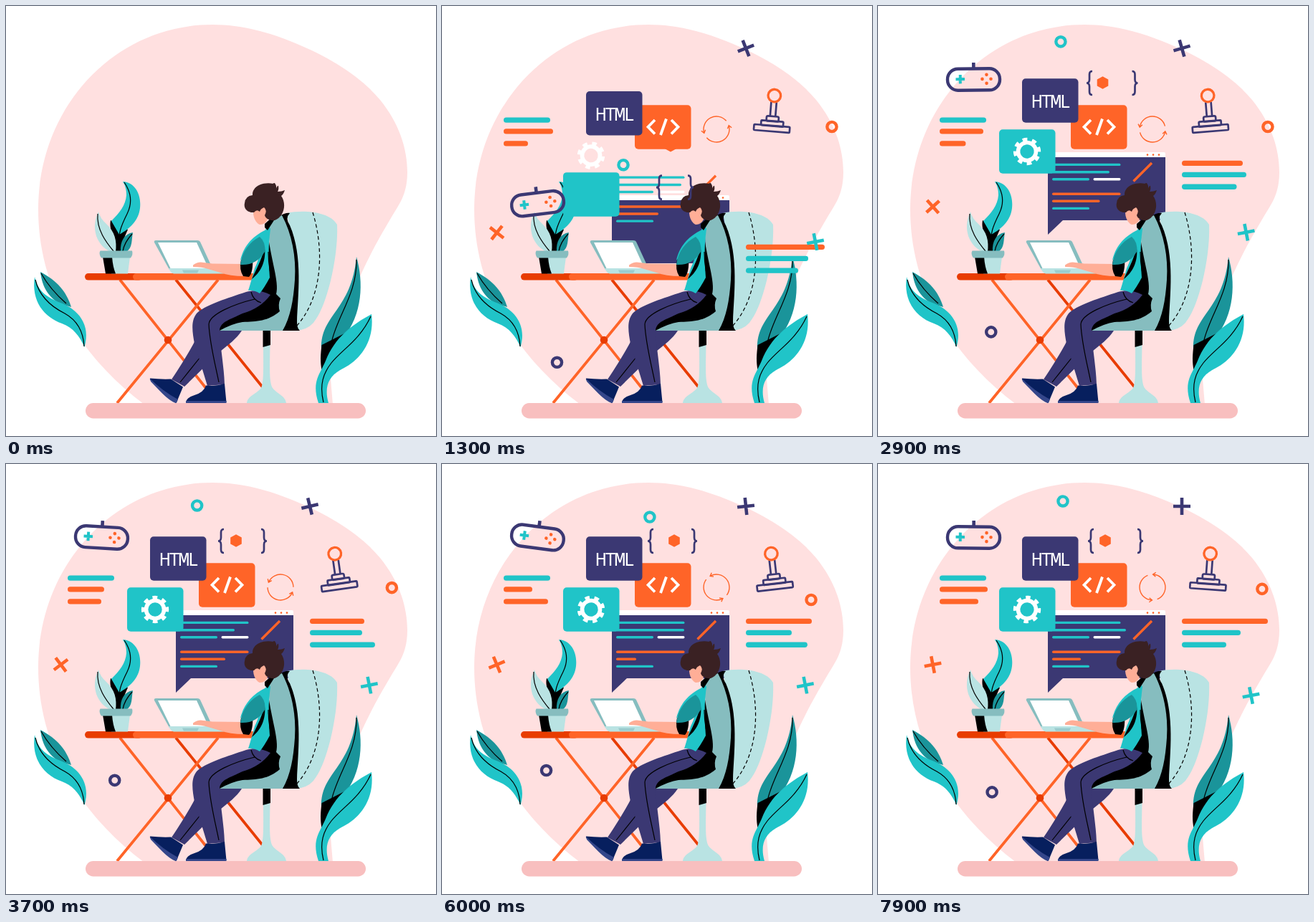
Write an HTML page without scripts that moves like this. It is 600 px wide and 600 px high and loops after 8000 ms.

```html
<!DOCTYPE html>
<html lang="en">
<head>
<meta charset="utf-8">
<title>Developer at a desk</title>
<style>
@property --t { syntax: "<number>"; inherits: true; initial-value: 0; }
html, body { margin: 0; width: 100%; height: 100%; overflow: hidden; background: #fff; }
svg { display: block; width: 100vw; height: 100vh; animation: clock 8s linear infinite; }
/* --t is the time in ms; all motion is worked out from it */
@keyframes clock { from { --t: 0; } to { --t: 8000; } }

.in {
  translate: 0 calc(118px * (1 + cos(clamp(0, (var(--t) - var(--at)) / 1255, 1) * 180deg)));
  opacity: clamp(0, (var(--t) - var(--at) - 35) / 365, 1);
}
.drift {
  --p: calc((1 - cos(max(0, var(--t) - var(--s)) / var(--per, 6200) * 360deg)) / 2);
  translate: calc(var(--x) * var(--p)) calc(var(--y) * var(--p));
}
.rock { rotate: calc(var(--amp) * sin((var(--t) - var(--zero)) / var(--half) * 180deg)); }
.spin { rotate: calc(var(--r) + var(--t) * var(--w)); }
.len { animation: len 8s linear infinite; }
.slide { animation: slide 8s linear infinite; }
@keyframes len {
  0%, 10% { width: var(--a); }
  16.25% { width: var(--b); }
  26.25% { width: var(--c); }
  46.25% { width: var(--d); }
  75% { width: var(--e); }
  98.75%, 100% { width: var(--f); }
}
@keyframes slide {
  0%, 10% { translate: var(--a); }
  16.25% { translate: var(--b); }
  26.25% { translate: var(--c); }
  46.25% { translate: var(--d); }
  75% { translate: var(--e); }
  98.75%, 100% { translate: var(--f); }
}

.teal { fill: #20c4c8; }
.deep { fill: #1a949a; }
.pale { fill: #b9e3e3; }
.grey { fill: #86bdbf; }
.orange { fill: #ff6428; }
.red { fill: #e83c00; }
.navy { fill: #3b3873; }
.skin { fill: #ffae97; }
.hair { fill: #3a2123; }
.shoe { fill: #071f5e; }
.sole { fill: #34468a; }
.white { fill: #fff; }
.line { fill: none; stroke: #000; stroke-width: 1.2; }
.s-teal, .s-orange, .s-red, .s-navy, .s-white { fill: none; }
.s-teal { stroke: #20c4c8; }
.s-orange { stroke: #ff6428; }
.s-red { stroke: #e83c00; }
.s-navy { stroke: #3b3873; }
.s-white { stroke: #fff; }
.html { font: 26px "Noto Sans Mono", "DejaVu Sans Mono", monospace; letter-spacing: -2.3px; }
</style>
</head>
<body>
<svg viewBox="0 0 600 600">
  <defs>
    <path id="plus" d="M-12 0H12M0-12V12" stroke-width="4.6"/>
    <circle id="ring" r="6.6" stroke-width="4.4"/>
    <path id="brace" d="M4-16.5Q0-16.5 0-12V-5Q0 0-4 0Q0 0 0 5V12Q0 16.5 4 16.5" stroke-width="2.7"/>
    <path id="arrow" d="M18 0A18 18 0 0 1-16.3 7.6M15 3.5 18-.5 21 3.5" stroke-width="1.4"/>
  </defs>

  <!-- backdrop -->
  <path fill="#ffe0e0" d="M288 26C330 26 368 37 404 52C450 71 494 97 522 131C548 163 560 198 560 232C560 262 549 276 540 291C524 318 509 344 496 373C475 420 451 470 453 520L456 556H193C150 524 112 483 86 437C58 388 45 336 45 284C45 140 152 26 288 26Z"/>

  <!-- code window -->
  <g class="in" style="--at:468">
    <path class="white" d="M237 212V206Q237 204 239 204H399Q401 204 401 206V212Z"/>
    <path class="navy" d="M237 211H401V297Q401 299 399 299H258L237 319Z"/>
    <g class="orange"><circle cx="376" cy="207.6" r="1.3"/><circle cx="384" cy="207.6" r="1.3"/><circle cx="392" cy="207.6" r="1.3"/></g>
  </g>
  <g class="in" style="--at:268">
    <g class="teal">
      <rect x="243" y="219.7" width="95.5" height="3.4" rx="1.7"/>
      <rect class="len" x="243" y="230" height="3.4" rx="1.7" style="--a:93px;--b:91px;--c:84px;--d:76px;--e:95px;--f:103px"/>
      <rect x="243" y="240" width="52" height="3.4" rx="1.7"/>
      <rect x="243" y="280.7" width="52" height="3.4" rx="1.7"/>
    </g>
    <rect class="white" x="300.5" y="240" width="38" height="3.4" rx="1.7"/>
    <g class="orange">
      <rect x="243" y="260.5" width="95.5" height="3.4" rx="1.7"/>
      <rect class="len" x="243" y="270.5" height="3.4" rx="1.7" style="--a:52px;--b:59px;--c:70px;--d:63px;--e:28px;--f:40px"/>
    </g>
    <path class="s-orange" d="M356.5 244.500 382 219" stroke-width="3.3"/>
  </g>

  <!-- upper cards -->
  <g class="in" style="--at:570">
    <path class="orange slide" d="M0 98.200 7.800 102.600V111.400L0 115.800-7.800 111.400V102.600Z" style="--a:326px;--b:319px;--c:306px;--d:321px;--e:324px;--f:317px"/>
  </g>
  <g class="in" style="--at:-30">
    <rect class="orange" x="269" y="138.300" width="78.500" height="61.500" rx="5"/>
    <path class="s-white" d="M297 159 287.500 168.800 297 178.500M320 159 329.500 168.800 320 178.500M313 157.500 305 180" stroke-width="3.800"/>
  </g>
  <g class="in" style="--at:268">
    <rect class="navy" x="201" y="101.200" width="78.500" height="61.500" rx="5"/>
    <text class="white html" x="213.900" y="142">HTML</text>
  </g>

  <!-- table -->
  <g stroke-width="3.800">
    <path class="s-red" d="M237 382 359 533"/>
    <path class="s-orange" d="M159 382 282 537M296 382 155 554"/>
  </g>
  <circle class="red" cx="226" cy="466" r="5.300"/>
  <rect class="red" x="110" y="373" width="80" height="9.600" rx="4.800"/>
  <rect class="orange" x="177" y="373" width="172" height="9.600" rx="4.800"/>

  <!-- laptop -->
  <path class="grey" d="M209 327H267Q270 327 271 329L289 368H228L207 330Q206 327 209 327Z"/>
  <path class="white" d="M212 330H266L283 367H230Z"/>
  <path class="pale" d="M227 366H296L304 373.500H234Q230 373 227 366Z"/>
  <path class="grey" d="M246 368.500H269L267 372.500H248Z" opacity=".6"/>

  <!-- potted plant -->
  <path d="M146 299C143 312 153 326 153 343H160C162 330 165 323 170 312Z"/>
  <path class="teal" d="M163 245C180 246 189 263 187 282C185 300 172 311 158 319L147 300C158 289 167 278 168 264Q168 252 163 245Z"/>
  <path class="line" d="M165 246C176 262 176 276 169 290C162 304 155 318 157 342"/>
  <path class="pale" d="M129 287Q131 296 140 304C152 315 155 328 153 343H146C128 335 117 312 129 287Z"/>
  <path class="line" d="M128 290C126 312 140 330 150 342" stroke-width=".8"/>
  <path class="deep" d="M177 316C165 318 159 328 160 343H168C177 337 175 326 177 316Z"/>
  <path class="line" d="M176 318Q165 330 163 342" stroke-width=".8"/>
  <path class="pale" d="M147 350H173L170 373.500H147Z"/>
  <path d="M135 350H148Q149 364 153 373.500H139Z"/>
  <path class="grey" d="M131.500 341.500H176Q177.500 347 174 351.500H133Q129 346 131.500 341.500Z"/>

  <!-- left leaves -->
  <path class="deep" d="M48 371C72 384 84 398 91 420L74 415C54 402 50 386 48 371Z"/>
  <path class="line" d="M49 373Q62 396 84 415"/>
  <path class="teal" d="M40 378C44 398 58 407 76 414C100 423 119 444 109.500 476C103 461 94 449 78 443C53 434 35 412 40 378Z"/>
  <path class="line" d="M41 382C47 408 66 421 82 429C100 439 108 455 109 475"/>

  <!-- right leaves -->
  <path class="deep" d="M489 350C499 385 498 430 470 464L440 478C439 430 482 425 489 350Z"/>
  <path d="M440.500 473 476 455C472 470 452 488 441 510C438 497 439 486 440.500 473Z"/>
  <path class="line" d="M489 354C490 400 464 430 455 466"/>
  <path class="teal" d="M510 430C515 472 490 497 468 507C449 517 444 533 450 554H436C426 524 438 514 446 495C459 462 484 444 510 430Z"/>
  <path class="line" d="M509 433C494 466 468 480 454 498C443 512 437 528 443 553"/>

  <!-- chair -->
  <path class="pale" d="M359 473H368.500C368 505 367 525 372 533C378 541 390 544 391 554H336C337 544 350 541 356 533C360 524 359 500 359 473Z"/>
  <path d="M358.500 452H369V473L358.500 476Z"/>
  <path class="pale" d="M392 289C412 284 452 286 462 305C464 350 448 420 429 442Q419 453 403 453L404 360Z"/>
  <path class="line" d="M428 288C444 340 442 405 406 446" stroke-dasharray="5 3.500" stroke-width="1.500"/>
  <path d="M380 294Q390 288 396 289Q389 296 396 306C415 350 407 405 406 440Q406 450 410 453H382Z"/>
  <path class="grey" d="M366 308Q376 294 385 292C399 318 405 350 403 382C401 411 397 434 386 453H297L302 438 372 400Z"/>
  <path d="M365 312C368 350 382 385 377 402L383 408Q379 417 382 426C366 440 350 440 330 441Q316 443 298 453L298 430 360 390Z"/>

  <!-- legs -->
  <path class="navy" d="M297 453H329C322 464 310 473 300 481L249 531 231 521Q252 490 266 463Z"/>
  <path class="line" d="M271 490 243 525"/>
  <path class="shoe" d="M201 519.500Q215 521 230 520.500L247 531.500 238 553Q220 540 204 525Q200 521 201 519.500Z"/>
  <path class="sole" d="M201 520Q218 537 240 549L237.500 554.500C225 550 212 534 202 524Z"/>
  <path class="navy" d="M369 403C358 397 346 396 335 399C308 408 282 416 268 427C257 437 260 455 263 471L281 530 305 528C304 500 298 470 298 452C300 440 312 438 330 429Q355 422 369 403Z"/>
  <path class="line" d="M342 399Q345 411 356 414M347 409C318 416 284 430 283 444C284 470 292 500 297 525" stroke-width="1.500"/>
  <path class="shoe" d="M279 529.500Q293 531 305 527L307.500 553H251Q252 546 263 543Q276 539 279 529.500Z"/>
  <path class="sole" d="M251 551H307.500V554H251Z"/>

  <!-- body -->
  <path class="skin" d="M261 361.500Q268 356 276 358L288 359.500 329 360 333 377Q312 377 299 372L282 367Q274 364 261 364Z"/>
  <path class="teal" d="M363 310Q368 307 369 311C365 340 367 360 368 379Q360 394 354 401Q345 396 338 397C342 385 344 376 347 366C357 346 355 332 363 310Z"/>
  <path d="M361 338C363 357 355 372 343 381C349 368 356 355 361 338Z"/>
  <path d="M328 354 344 352C345 364 343 374 339 378L331 377Q325 368 328 354Z"/>
  <path class="teal" d="M327 355C331 337 342 322 363 312L364 333Q350 326 327 355Z"/>
  <path class="deep" d="M327 361C329 343 340 329 354 322Q363 330 361 343C353 356 342 362 327 361Z"/>
  <path class="line" d="M366 343Q366 370 375 394" stroke="#333"/>
  <path d="M361 304 371 295 374 299 365 313 361 309Z"/>
  <path class="skin" d="M346 284C343 291 348 303 354 305C361 305 365 300 366 294L366 278 350 278Z"/>
  <path class="hair" d="M346 288C338 289 331 283 333 275Q334 265 344 264C343 252 358 245 373 248Q371 247 375 247Q378 251 377 255Q379 250 380 251Q381 256 379 259Q385 259 389 257Q387 263 384 265C392 276 388 294 375 299C367 300 362 296 361 292Q365 285 360 281Q355 283 354 287Q350 283 346 288Z"/>
  <rect x="111" y="554" width="391" height="21.500" rx="10.700" fill="#f8bfbf"/>

  <!-- gear card -->
  <g class="in" style="--at:468"><rect class="teal" x="169" y="172.200" width="78.500" height="61.500" rx="5"/></g>
  <g class="in" style="--at:169" transform="translate(208 203)">
    <g class="spin s-white" style="--r:0deg;--w:.012deg">
      <circle r="12.500" stroke-width="5.600"/>
      <circle r="16.700" stroke-width="5" pathLength="16" stroke-dasharray="1" stroke-dashoffset=".5"/>
    </g>
  </g>

  <!-- text lines -->
  <g class="in" style="--at:-30">
    <rect class="teal" x="86" y="155.500" width="65" height="7.300" rx="3.600"/>
    <rect class="orange len" x="86" y="171.300" height="7.300" rx="3.600" style="--a:56px;--b:69px;--c:71px;--d:51px;--e:40px;--f:67px"/>
    <rect class="orange len" x="86" y="188.300" height="7.300" rx="3.600" style="--a:39px;--b:34px;--c:26px;--d:47px;--e:62px;--f:54px"/>
  </g>
  <g class="in" style="--at:670">
    <rect class="orange len" x="424" y="215.800" height="7.300" rx="3.600" style="--a:117px;--b:110px;--c:94px;--d:76px;--e:92px;--f:120px"/>
    <rect class="teal len" x="424" y="231.800" height="7.300" rx="3.600" style="--a:72px;--b:87px;--c:107px;--d:73px;--e:64px;--f:82px"/>
    <rect class="teal len" x="424" y="248.600" height="7.300" rx="3.600" style="--a:78px;--b:73px;--c:62px;--d:91px;--e:86px;--f:62px"/>
  </g>

  <!-- braces -->
  <g class="in s-navy" style="--at:768" transform="translate(0 107.500)">
    <g class="slide" style="--a:303px;--b:303px;--c:290px;--d:300px;--e:291px;--f:297px"><use href="#brace"/></g>
    <g class="slide" style="--a:347px;--b:347px;--c:357px;--d:360px;--e:352px;--f:366px"><use href="#brace" transform="scale(-1 1)"/></g>
  </g>

  <!-- turning arrows -->
  <g class="in" style="--at:-30" transform="translate(383 172)">
    <g class="spin s-orange" style="--r:-37deg;--w:.0165deg">
      <use href="#arrow"/><use href="#arrow" transform="rotate(180)"/>
    </g>
  </g>

  <!-- joystick -->
  <g class="in" style="--at:-30" transform="translate(462 148)">
    <g class="rock s-navy" stroke-width="2.700" style="--amp:-9.700deg;--zero:2100;--half:5100">
      <path d="M-3.700-14V6M3.700-14V6"/>
      <rect x="-8.500" y="6" width="17" height="7" rx="2"/>
      <rect x="-15.500" y="12.500" width="31" height="7" rx="1"/>
      <rect x="-25" y="19" width="50" height="8" rx="1"/>
      <circle class="s-orange" cy="-23" r="8.800" stroke-width="3.300"/>
    </g>
  </g>

  <!-- gamepad -->
  <g class="in" style="--at:868" transform="translate(133.500 102)">
    <g class="rock" style="--amp:8deg;--zero:3000;--half:5000">
      <rect class="s-navy" x="-36.500" y="-14.500" width="73" height="30" rx="14.500" stroke-width="4.400"/>
      <path class="s-navy" d="M0-23V-15" stroke-width="4.600"/>
      <path class="s-teal" d="M-25 0H-12.500M-18.700-6.200V6.200" stroke-width="4"/>
      <g class="orange"><circle cx="18" cy="-6" r="2.300"/><circle cx="18" cy="6" r="2.300"/><circle cx="12" r="2.300"/><circle cx="24" r="2.300"/></g>
    </g>
  </g>

  <!-- rings -->
  <g class="in" style="--at:-30" transform="translate(544 168.500)">
    <g class="drift s-orange" style="--s:2800;--x:-29px;--y:21px"><use href="#ring"/></g>
  </g>
  <g class="in" style="--at:868" transform="translate(253 48.500)">
    <g class="drift s-teal" style="--s:2460;--per:6160;--x:39px;--y:27px"><use href="#ring"/></g>
  </g>
  <g class="in" style="--at:368" transform="translate(160.500 461)">
    <g class="drift s-navy" style="--s:2055;--per:6440;--x:-17px;--y:-38px"><use href="#ring"/></g>
  </g>

  <!-- plus signs -->
  <g class="in" style="--at:-30" transform="translate(424 59)">
    <g class="spin s-navy" style="--r:-25.600deg;--w:.00324deg"><use href="#plus"/></g>
  </g>
  <g class="in" style="--at:368" transform="translate(76.500 280)">
    <g class="spin s-orange" style="--r:30deg;--w:.0062deg"><use href="#plus"/></g>
  </g>
  <g class="in" style="--at:169" transform="translate(521 323.500)">
    <g class="drift s-teal" style="--s:1450;--per:6800;--x:-19px;--y:-20px"><use href="#plus" transform="rotate(-11)"/></g>
  </g>
</svg>
</body>
</html>
```
